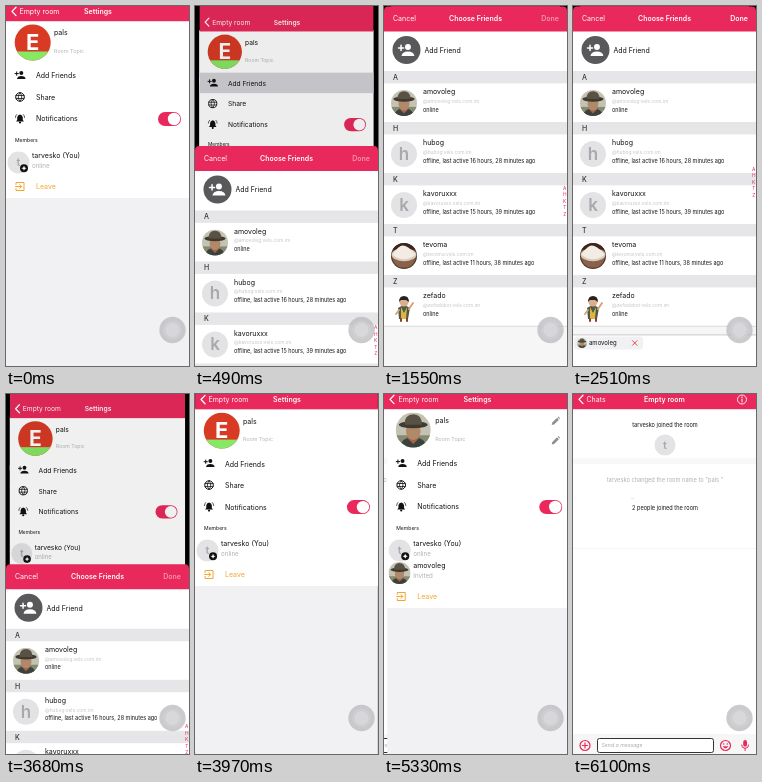
Write an HTML page that moves like this. It is 183 px wide and 360 px high and loops after 6170 ms.

```html
<!DOCTYPE html>
<html lang="en">
<head>
<meta charset="utf-8">
<title>Room settings</title>
<style>
  html, body { margin: 0; width: 100%; height: 100%; overflow: hidden; background: #000; }
  svg { display: block; width: 100vw; height: 100vh; }
  text { font-family: Inter, "Liberation Sans", sans-serif; white-space: pre; }
</style>
</head>
<body>
<script>
const LOOP = 6170, PINK = '#e9295b', ORANGE = '#f3a532';

// Markup helpers; y in text() is the optical middle of the line
const text = (x, y, s, size = 7, fill = '#111', more = '') =>
  `<text x="${x}" y="${y + size * 0.35}" font-size="${size}" fill="${fill}" ${more}>${s}</text>`;
const MID = 'text-anchor="middle"', BOLD = 'font-weight="600"';
const rect = (x, y, w, h, fill, more = '') =>
  `<rect x="${x}" y="${y}" width="${w}" height="${h}" fill="${fill}" ${more}/>`;
const disc = (x, y, r, fill, more = '') =>
  `<circle cx="${x}" cy="${y}" r="${r}" fill="${fill}" ${more}/>`;
const path = (d, fill, more = '') => `<path d="${d}" fill="${fill}" ${more}/>`;
const line = (d, color, w = 1) =>
  path(d, 'none', `stroke="${color}" stroke-width="${w}" stroke-linecap="round" stroke-linejoin="round"`);
const at = (x, y, k, body) => `<g transform="translate(${x} ${y}) scale(${k})">${body}</g>`;
const group = (id, body, more = '') => `<g id="${id}" ${more}>${body}</g>`;

// Avatars
const letter = (x, y, r, s, size) =>
  disc(x, y, r, '#e3e3e5') + text(x, y, s, size, '#a9a9ad', `${MID} ${BOLD}`);
const hatMan = (x, y, r) => at(x, y, r / 10, `<g clip-path="url(#round)">
  ${rect(-10, -10, 20, 20, '#c4c3b3')}${rect(-10, 3, 20, 7, '#858a70')}
  ${path('M-8 11Q-7 4 0 4Q7 4 8 11Z', '#39423c')}
  ${path('M-4 4L0 8L4 4Z', '#a8604a')}
  <ellipse cx="0" cy="0.5" rx="4.2" ry="5.2" fill="#b08a68"/>
  <ellipse cx="0" cy="-3" rx="8.2" ry="2" fill="#3f392f"/>
  ${path('M-5 -3Q-5 -9 0 -9Q5 -9 5 -3Z', '#5a5145')}</g>`);
const bowl = (x, y, r) => at(x, y, r / 10, `<g clip-path="url(#round)">
  ${rect(-10, -10, 20, 20, '#59382b')}${rect(-10, -10, 20, 5, '#3d241d')}
  ${path('M-9.5 -1Q-8 9 0 9Q8 9 9.5 -1Z', '#8a614a')}
  <ellipse cx="0" cy="-1" rx="9.5" ry="5" fill="#d8cabd"/>
  ${path('M-9 -1Q-4 -8 -1 -8Q3 -8 9 -1Q0 6 -9 -1Z', '#f3ece4')}</g>`);
const sticker = (x, y) => at(x, y, 1,
  path('M-5 12L-6 1Q0 -4 6 1L4 12Z', '#4c5a48') + path('M-3 0L0 6L3 0L2 12H-3Z', '#dfb445') +
  line('M5 2L9 -4M-5 3L-8 7', '#d9a27c', 2) + disc(0, -5, 4.5, '#dcae8b') +
  path('M-5 -5Q-5 -11 0 -11Q5 -11 5 -5L2 -7L-3 -7Z', '#26221f') +
  line('M-3 12V14M3 12V14', '#8e3c2e', 2));

// Icons
const person = color => disc(1.3, -2, 2, color) + path('M-3 4Q-2.6 1 1.3 1Q5.2 1 5.6 4Z', color) +
  line('M-5 -1.4H-1.6M-3.3 -3.1V.3', color, 1);
const globe = disc(0, 0, 4.3, 'none', 'stroke="#111"') +
  line('M-4 -1.5H4M-4 1.5H4M0 -4.2Q-3.6 0 0 4.2Q3.6 0 0 -4.2', '#111', .8);
const bell = path('M-4 3L-2.8 1.5V-1Q-2.6 -3.6 0 -4Q2.6 -3.6 2.8 -1V1.5L4 3Z', '#111') +
  disc(0, 4, 1.1, '#111') + line('M-4.6 -1Q-4.5 -3 -3.4 -4M4.6 -1Q4.5 -3 3.4 -4', '#111', .7);
const exit = line('M-4 -2V-4H4V4H-4V2M-4.5 0H1.5M-.3 -1.9L1.6 0L-.3 1.9', ORANGE, 1);
const pencil = path('M-4 4L-3.5 1.6L1.3 -3.2L3.2 -1.3L-1.6 3.5ZM1.9 -3.8L2.7 -4.4L4.4 -2.7L3.8 -1.9Z', '#909094');
const chevron = line('M10 1.2L6 5.4L10 9.6', '#fff', 1.3);

// Settings page
const settings = rect(0, 14, 183, 360, '#f1f1f3') +
  rect(0, 14, 183, 178, '#fff') + group('sheetTail', rect(0, 170, 183, 22, '#fff')) +
  group('roomOld', `<g clip-path="url(#room)">${rect(8, 18, 38, 37, '#d83a24')}${rect(8, 45.5, 38, 10, '#86e865')}</g>` +
    text(26.7, 36.5, 'E', 22, '#fff', `${MID} font-weight="700"`)) +
  group('roomNew', hatMan(26, 36, 17.5) + at(168.5, 27, 1, pencil) + at(168.5, 46.5, 1, pencil)) +
  text(48, 27, 'pals') + text(48, 45, 'Room Topic', 5.4, '#b4b4b8') +
  group('press', rect(0, 58.5, 183, 21.5, '#d3d3d7')) +
  at(14, 69, 1, person('#111')) + at(14, 91, 1, globe) + at(14, 112.5, 1, bell) +
  text(30, 70, 'Add Friends') + text(30, 91.5, 'Share') + text(30, 113, 'Notifications') +
  rect(152, 106, 23, 14, PINK, 'rx="7"') + disc(168, 113, 6.2, '#fff') +
  text(9, 134, 'Members', 5.1) +
  letter(12.5, 156.5, 11, 't', 11) + disc(18, 162.3, 4, '#111') +
  path('M18 159.8L18.8 161.6L20.6 162.3L18.8 163L18 164.8L17.2 163L15.4 162.3L17.2 161.6Z', '#fff') +
  text(26, 150, 'tarvesko (You)') + text(26, 160, 'online', 6.2, '#b0b0b4') +
  group('invited', hatMan(12.3, 179, 11) + text(26, 172, 'amovoleg') + text(26, 182, 'Invited', 6.2, '#b0b0b4')) +
  group('leave', at(14, 180.5, 1, exit) + text(30, 181, 'Leave', 7, ORANGE));

// Chat page
const face = disc(152.5, 351.5, 5, 'none', `stroke="${PINK}" stroke-width="1.2"`) +
  disc(150.7, 350, .8, PINK) + disc(154.3, 350, .8, PINK) + path('M149.6 352.3H155.4Q152.5 356.6 149.6 352.3Z', PINK);
const chat = rect(0, 14, 183, 360, '#fff') +
  text(92, 31, 'tarvesko joined the room', 5.6, '#111', MID) + letter(92, 51, 10.5, 't', 11) +
  rect(0, 64, 183, 6, '#f8f8f8') +
  text(92, 86, 'tarvesko changed the room name to "pals "', 5.7, '#b0b0b4', MID) +
  rect(58, 104, 3, .6, '#d6d6d6') + text(92, 114.5, '2 people joined the room', 5.6, '#111', MID) +
  rect(0, 154, 183, .6, '#efefef') + rect(0, 340, 183, 34, '#f6f6f6') +
  disc(12, 351.5, 5, 'none', `stroke="${PINK}" stroke-width="1.2"`) + line('M9.4 351.5H14.6M12 348.9V354.1', PINK, 1.2) +
  rect(24.5, 344.5, 116, 14, '#fff', 'rx="2" stroke="#333"') +
  text(28.5, 351.5, 'Send a message', 5.2, '#a8a8ac', 'font-style="italic"') + face +
  rect(170.2, 346, 3.8, 6.6, PINK, 'rx="1.9"') + line('M168.6 351Q168.8 354.3 172.1 354.3Q175.4 354.3 175.6 351M172.1 354.3V356.6', PINK, 1);

const nav = rect(0, -25, 183, 40.2, PINK) + chevron +
  group('backOld', text(13.5, 5.5, 'Empty room', 7, '#fff')) +
  group('titleOld', text(92, 5.5, 'Settings', 7, '#fff', `${MID} ${BOLD}`)) +
  group('backNew', text(13.5, 5.5, 'Chats', 7, '#fff')) +
  group('titleNew', text(91.5, 5.5, 'Empty room', 7, '#fff', `${MID} ${BOLD}`)) +
  group('info', disc(169, 5.5, 4.5, 'none', 'stroke="#fff" stroke-width=".9"') +
    disc(169, 3.2, .7, '#fff') + line('M169 5V8', '#fff', 1));

// Friend picker, laid out from its own top edge
const friends = [
  ['amovoleg', 'amovoleg', 'online', (x, y) => hatMan(x, y, 13)],
  ['hubog', 'hubog', 'offline, last active 16 hours, 28 minutes ago', (x, y) => letter(x, y, 13, 'h', 17)],
  ['kavoruxxx', 'kavoruxxx', 'offline, last active 15 hours, 39 minutes ago', (x, y) => letter(x, y, 13, 'k', 17)],
  ['tevoma', 'tevoma', 'offline, last active 11 hours, 38 minutes ago', (x, y) => bowl(x, y, 13)],
  ['zefado', 'zefadobot', 'online', sticker],
];
const friendRow = ([name, user, status, avatar], i) => {
  const y = 66 + i * 51;
  return rect(0, y, 183, 12.4, '#e6e6e8') + text(9, y + 6.3, name[0].toUpperCase(), 7, '#333', 'font-weight="500"') +
    avatar(20, y + 32) + text(39, y + 21, name) +
    text(39, y + 30, `@${user}:vels.com.im`, 4.9, '#c6c6ca') + text(39, y + 38.7, status, 5.5);
};
const picker = rect(0, 20, 183, 400, '#f6f6f7') + rect(0, 20, 183, 300, '#fff') +
  path('M0 26.4V5.9Q0 1.5 4.4 1.5H178.6Q183 1.5 183 5.9V26.4Z', PINK) +
  text(9, 14, 'Cancel', 7, '#fff') + text(91.5, 14, 'Choose Friends', 7, '#fff', `${MID} ${BOLD}`) +
  group('done', text(175, 14, 'Done', 7, '#fff', `text-anchor="end" ${BOLD}`)) +
  disc(22.5, 45, 14, '#59595c') + at(22, 45, 1.5, person('#fff')) + text(40.5, 45.3, 'Add Friend') +
  group('tap', rect(0, 78.4, 183, 38.6, '#d9d9dc')) + friends.map(friendRow).join('') +
  rect(0, 321, 183, .6, '#d4d4d6') +
  group('index', [...'AHKTZ'].map((c, i) => text(180.7, 183 + i * 6.5, c, 4.8, PINK, MID)).join('')) +
  group('bar', rect(0, 330, 183, 50, '#fff') + rect(0, 329.6, 183, .7, '#b5b5b8') +
    rect(1, 331.5, 69, 13, '#f1f1f3', 'rx="3"') +
    hatMan(9, 338, 5) + text(16, 338, 'amovoleg', 6) + line('M59.5 335.7L64 340.3M64 335.7L59.5 340.3', '#e43d3d', .9));

const touch = disc(166.5, 324, 13.2, '#b9b9be', 'opacity=".75"') + disc(166.5, 324, 9.6, '#d2d2d6', 'opacity=".6"') +
  disc(166.5, 324, 7, '#dedee1', 'opacity=".6"');

document.body.innerHTML = `<svg viewBox="0 0 183 360" preserveAspectRatio="none">
  <defs><clipPath id="round"><circle r="10"/></clipPath>
  <clipPath id="room"><circle cx="26.7" cy="36.5" r="18"/></clipPath>
  <clipPath id="page">${rect(0, -25, 183, 396, '#000')}</clipPath></defs>
  ${rect(0, 0, 183, 360, '#000')}
  ${group('card', group('chat', chat) + group('settings', settings) + nav +
    group('dim', rect(0, -25, 183, 396, '#000')), 'clip-path="url(#page)"')}
  ${group('picker', picker)}${touch}</svg>`;

const el = {};
document.querySelectorAll('g[id]').forEach(g => el[g.id] = g);
const move = (id, x, y) => el[id].setAttribute('transform', `translate(${x} ${y})`);
const fade = (id, a) => el[id].setAttribute('opacity', a);
const clamp = v => Math.max(0, Math.min(1, v));

// Critically damped spring from 0 to 1
const spring = (t, start) => {
  const u = Math.max(0, t - start) * 0.01826;
  return 1 - Math.exp(-u) * (1 + u);
};
const ease = (t, start, span) => { const u = clamp((t - start) / span); return u * u * (3 - 2 * u); };

const CLOSE = 3596.5;

function draw(t) {
  // Picker comes up, the page behind it shrinks
  const up = t < CLOSE ? spring(t, 375) : 1 - spring(t, CLOSE);
  const p = up > 0.9995 ? 1 : up < 0.0005 ? 0 : up;
  el.card.setAttribute('transform', `translate(${7.05 * p} ${17.6 * p}) scale(${1 - 0.077 * p})`);
  fade('dim', 0.11 * p);
  move('picker', 0, 371 - 372 * p);
  fade('press', t >= 190 && t < 1300 ? 1 : 0);

  // Choosing a friend
  const chosen = t >= 2110 && t < CLOSE;
  fade('tap', t < 2040 ? 0 : 1 - ease(t, 2150, 250));
  fade('done', chosen ? 1 : 0.5);
  fade('bar', ease(t, 2110, 200));
  move('index', 0, -19 * ease(t, 2110, 200));

  // The invited member joins the list
  const added = t >= 4610, grow = ease(t, 4610, 130);
  fade('roomOld', added ? 0 : 1);
  fade('roomNew', added ? 1 : 0);
  fade('invited', grow);
  move('leave', 0, 22 * grow);
  move('sheetTail', 0, 22 * grow);

  // Back to the chat
  const q = spring(t, 5320);
  move('settings', 183 * q, 0);
  move('chat', -55 * (1 - q), 0);
  move('backOld', 57 * q, 0);
  move('titleOld', 80 * q, 0);
  move('titleNew', -57 * (1 - q), 0);
  move('backNew', -25 * (1 - q), 0);
  fade('backOld', clamp(1 - 1.6 * q));
  fade('titleOld', clamp(1 - 1.3 * q));
  ['titleNew', 'backNew', 'info'].forEach(id => fade(id, clamp(1.6 * q - 0.6)));
}

const start = performance.now();
function tick() {
  draw((performance.now() - start) % LOOP);
  requestAnimationFrame(tick);
}
tick();
</script>
</body>
</html>
```
